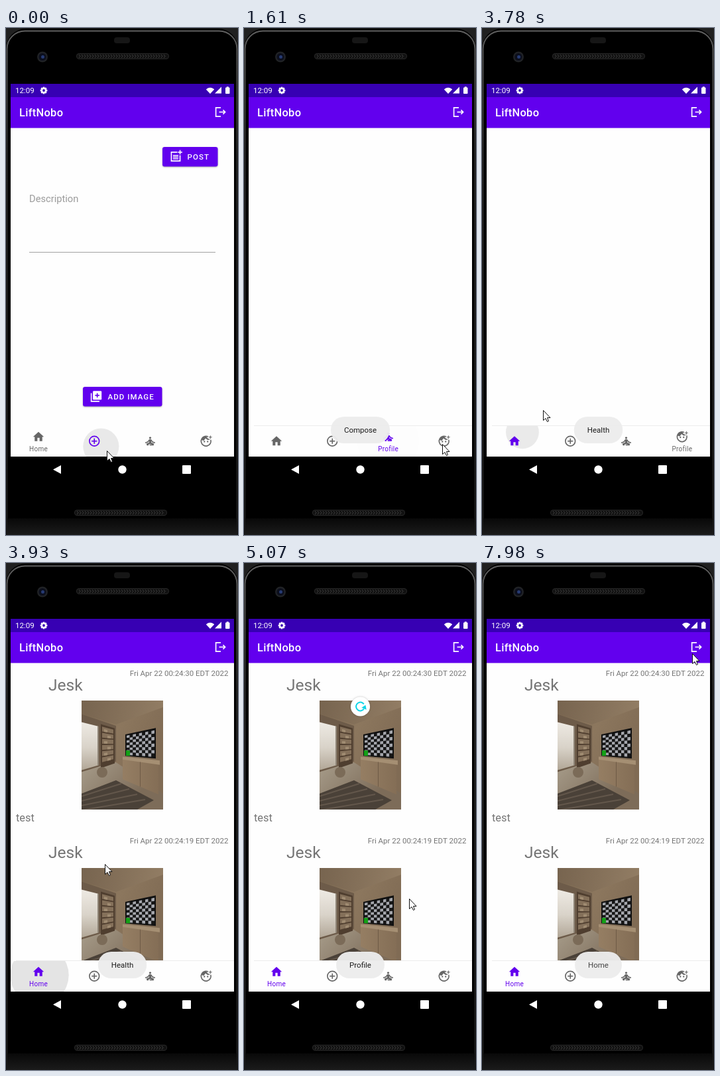
Write an HTML page with a canvas that moves like this. It is 350 px wide and 763 px high and loops after 8000 ms.

```html
<!DOCTYPE html>
<html lang="en">
<head>
<meta charset="utf-8">
<title>Phone app tour</title>
<style>
html, body { margin: 0; height: 100%; overflow: hidden; background: #000; }
canvas { display: block; width: 350px; height: 763px; }
</style>
</head>
<body>
<canvas id="stage" width="350" height="763"></canvas>
<script>
const ctx = document.getElementById('stage').getContext('2d');
const LOOP = 8000, STEP = 135, FIRST_STEP = 120;
const PURPLE = '#6200ee', GREY = '#757575', NAV_GREY = '#666';
const PAGE = { x: 7, y: 150, w: 337, h: 495 };
const NAV_TOP = 599, MIDDLE = 175.5;
const clamp = v => Math.max(0, Math.min(1, v));
const mix = (a, b, k) => a + (b - a) * k;
const progress = (t, start, end) => clamp((t - start) / (end - start));

// Each tap selects the next tab, wrapping back to the first.
const labels = ['Home', 'Compose', 'Profile', 'Profile'];
const tabX = i => 49 + i * 84.25;
const taps = [-120, 1090, 2290, 3660].map((at, i) => ({ at, from: i, to: (i + 1) % 4 }));
const toasts = [
  { at: 1200, label: 'Compose' }, { at: 2280, label: 'Health' },
  { at: 4300, label: 'Profile' }, { at: 6000, label: 'Home' }
];
const pull = { start: 4150, end: 4440, settle: 4650, gone: 5220 };
const moves = [
  { start: 0, end: 390, x: 220, y: 631 },
  { start: 1200, end: 1470, x: 299, y: 626 },
  { start: 3000, end: 3500, x: 69, y: 599 },
  { start: 3660, end: 3765, x: 92, y: 575 },
  { start: 3765, end: 4080, x: 225, y: 290 },
  { start: pull.start, end: pull.end, x: 249, y: 505 },
  { start: 5400, end: 6200, x: 317, y: 136 }
];
function cursorAt(t) {
  let x = 152, y = 636;
  for (const m of moves) {
    const k = progress(t, m.start, m.end);
    x = mix(x, m.x, k);
    y = mix(y, m.y, k);
  }
  return { x, y };
}

function rect(x, y, w, h, color, r = 0) {
  ctx.fillStyle = color;
  ctx.beginPath();
  ctx.roundRect(x, y, w, h, r);
  ctx.fill();
}
function disc(x, y, r, color) {
  ctx.fillStyle = color;
  ctx.beginPath();
  ctx.arc(x, y, r, 0, 7);
  ctx.fill();
}
function ring(x, y, r, color, width, from = 0, to = Math.PI * 2) {
  ctx.strokeStyle = color;
  ctx.lineWidth = width;
  ctx.beginPath();
  ctx.arc(x, y, r, from, to);
  ctx.stroke();
}
function trace(points) {
  ctx.beginPath();
  for (let i = 0; i < points.length; i += 2) ctx.lineTo(points[i], points[i + 1]);
}
function poly(color, ...points) {
  ctx.fillStyle = color;
  trace(points);
  ctx.closePath();
  ctx.fill();
}
function line(color, width, ...points) {
  ctx.strokeStyle = color;
  ctx.lineWidth = width;
  trace(points);
  ctx.stroke();
}
function plus(x, y, r, color, width) {
  line(color, width, x - r, y, x + r, y);
  line(color, width, x, y - r, x, y + r);
}
function text(str, x, y, size, color, { weight = 400, align = 'left', spacing = 0 } = {}) {
  ctx.font = `${weight} ${size}px Roboto, sans-serif`;
  ctx.letterSpacing = spacing + 'px';
  ctx.textAlign = align;
  ctx.fillStyle = color;
  ctx.fillText(str, x, y);
}
function scoped(draw) {
  ctx.save();
  draw();
  ctx.restore();
}
function clipped(x, y, w, h, draw) {
  scoped(() => {
    ctx.beginPath();
    ctx.rect(x, y, w, h);
    ctx.clip();
    draw();
  });
}
// Draws on a 24-unit icon grid centred on x, y.
function icon(x, y, draw, color) {
  scoped(() => {
    ctx.translate(x, y);
    ctx.scale(.82, .82);
    ctx.translate(-12, -12);
    draw(color);
  });
}
function gradient(x1, y1, x2, y2, ...colors) {
  const g = ctx.createLinearGradient(x1, y1, x2, y2);
  colors.forEach((c, i) => g.addColorStop(i / (colors.length - 1), c));
  return g;
}

function home(color) {
  poly(color, 12, 3, 22, 12, 19, 12, 19, 20, 14, 20, 14, 14, 10, 14, 10, 20, 5, 20, 5, 12, 2, 12);
}
function compose(color) {
  ring(12, 12, 9, color, 2);
  plus(12, 12, 5, color, 2);
}
function yoga(color) {
  disc(12, 6, 2, color);
  line(color, 2, 3, 15, 7.5, 13.5, 10.5, 10, 13.5, 10, 16.5, 13.5, 21, 15);
  rect(10, 9, 4, 7, color);
  line(color, 3, 5.5, 18, 12, 15.6, 18.5, 18);
  line(color, 2, 6, 19, 9, 19);
  line(color, 2, 11, 19, 18.5, 19);
}
function face(color) {
  ring(12, 12, 9, color, 2, -.25, 5.15);
  poly(color, 3, 10, 7, 4, 12, 3, 15, 7, 20, 9, 15, 10, 11, 7, 8, 11);
  for (const x of [9, 15]) disc(x, 13, 1.4, color);
  scoped(() => {
    ctx.translate(20, 4.8);
    for (let i = 0; i < 4; i++) {
      poly(color, 0, -3.8, 1, -1, -1, -1);
      ctx.rotate(Math.PI / 2);
    }
    rect(-1, -1, 2, 2, color);
  });
}
const tabIcons = [home, compose, yoga, face];
function note(color) {
  line(color, 2, 15, 4, 4, 4, 4, 20, 20, 20, 20, 9.5);
  for (const y of [10, 13, 16]) line(color, 1.8, 7, y, 17, y);
  plus(20, 4, 4, color, 2);
}
function stack(color) {
  line(color, 2, 3, 6, 3, 21, 18, 21);
  rect(6, 2, 16, 16, color, 1.5);
  plus(14, 10, 4, PURPLE, 2);
}
function logout(color) {
  line(color, 2, 12, 4, 3, 4, 3, 20, 12, 20);
  line(color, 2, 9, 12, 20, 12);
  line(color, 2, 16.2, 8.2, 20, 12, 16.2, 15.8);
}
function gear(color) {
  for (let i = 0; i < 4; i++) {
    const a = i * Math.PI / 4, c = Math.cos(a) * 6.5, s = Math.sin(a) * 6.5;
    line(color, 3.2, 12 - c, 12 - s, 12 + c, 12 + s);
  }
  disc(12, 12, 5, color);
  disc(12, 12, 2.3, '#3700b3');
}

function speaker(x, y) {
  rect(x, y, 140, 9, '#292929', 4.5);
  rect(x + 1, y + 1, 138, 7, '#111', 3.5);
  for (let i = 4; i < 136; i += 4) line('#414141', 1, x + i, y + 2, x + i + 2, y + 4.5, x + i, y + 7);
}
function phone() {
  rect(0, 0, 350, 763, '#202020');
  rect(0, 1, 350, 790, '#000', 30);
  ctx.strokeStyle = gradient(0, 0, 0, 763, '#606060', '#2c2c2c', '#242424', '#202020', '#1a1a1a');
  ctx.lineWidth = 2;
  ctx.beginPath();
  ctx.roundRect(1.5, 4.5, 347, 790, 27);
  ctx.stroke();
  rect(2, 738, 346, 25, gradient(0, 736, 0, 763, '#070707', '#1b1b1b'));
  rect(163, 14, 24, 9, '#161616', 4);
  speaker(106, 38);
  speaker(103, 725);
  disc(55, 43.5, 8, '#202225');
  disc(55, 43.5, 5.5, '#0b0e1c');
  disc(55.5, 43.5, 2.5, '#263a72');
}
function systemBar() {
  poly('#fff', 71, 664.5, 83, 658, 83, 671);
  disc(MIDDLE, 664.5, 6.2, '#fff');
  rect(266, 658, 13, 13, '#fff', 1);
}
function statusAndTitle() {
  rect(PAGE.x, 84, PAGE.w, 20, '#3700b3');
  rect(PAGE.x, 104, PAGE.w, 46.5, PURPLE);
  text('12:09', 14, 98, 11.6, '#fff');
  icon(57, 94, gear, '#fff');
  ctx.fillStyle = '#fff';
  ctx.beginPath();
  ctx.moveTo(308, 99);
  ctx.arc(308, 98, 8.2, -Math.PI * .77, -Math.PI * .23);
  ctx.fill();
  poly('#fff', 315, 98.5, 325, 98.5, 325, 88.5);
  rect(331, 89.5, 6.5, 9.5, '#fff', 1);
  rect(332.8, 88.3, 3, 2, '#fff');
  text('LiftNobo', 20, 133, 16.4, '#fff', { weight: 500, spacing: .3 });
  icon(324, 126.5, logout, '#fff');
}

function button(x, y, w, label, glyph) {
  scoped(() => {
    ctx.shadowColor = 'rgba(0,0,0,.3)';
    ctx.shadowBlur = 2;
    ctx.shadowOffsetY = 1;
    rect(x, y, w, 29.5, PURPLE, 3.3);
  });
  icon(x + 20, y + 14.5, glyph, '#fff');
  text(label, x + 37.5, y + 19, 11.5, '#fff', { weight: 500, spacing: 1.05 });
}
function composePage() {
  button(236, 179, 83.5, 'POST', note);
  text('Description', 35, 262, 14.7, '#9b9b9b');
  rect(35, 337, 281, 1, '#a2a2a2');
  button(116, 540, 119.5, 'ADD IMAGE', stack);
}

// A wall panel whose top and bottom edges run to a vanishing point with the given slopes.
function panel(vanish, color, x1, x2, top, bottom) {
  const y = (x, slope) => vanish.y + slope * Math.abs(x - vanish.x);
  poly(color, x1, y(x1, top), x2, y(x2, top), x2, y(x2, bottom), x1, y(x1, bottom));
}
function windowWall() {
  const onWall = (...args) => panel({ x: 134, y: 66 }, ...args);
  onWall('#6d5b49', 0, 52, -.34, .31);
  onWall(gradient(0, 35, 0, 106, '#ece8e1', '#d9d3c9', '#b0a595'), 0, 25, -.25, .29);
  onWall('#8f8577', 24, 26, -.25, .29);
  onWall('#4f3e2f', 29, 50, -.29, .34);
  for (let i = 0; i < 6; i++) {
    const shelf = mix(-.26, .28, i / 6);
    onWall('#84705a', 31, 48, shelf, shelf + .07);
    onWall('#a08c72', 34 + i % 2 * 5, 39 + i % 2 * 5, shelf + .03, shelf + .07);
  }
}
function tvWall() {
  const onWall = (...args) => panel({ x: -44, y: 74 }, ...args);
  onWall(gradient(62, 0, 116, 0, '#957e63', '#846e56'), 62, 116, .13, .42);
  onWall('#a58f73', 62, 118, .1, .14);
  onWall('#6e5b46', 88, 89, .14, .42);
  onWall('#111', 66, 112, -.21, .085);
  const cols = 9, rows = 8, slope = k => mix(-.19, .07, k / rows);
  for (let c = 0; c < cols; c++)
    for (let r = 0; r < rows; r++)
      onWall((c + r) % 2 ? '#161616' : '#a4a6ac', mix(68, 110, c / cols), mix(68, 110, (c + 1) / cols), slope(r), slope(r + 1));
  onWall('#13a016', 67, 73, .01, .08);
}
function room(x, y) {
  clipped(x, y, 123, 164, () => {
    ctx.translate(x, y);
    rect(0, 0, 123, 164, gradient(0, 0, 123, 60, '#79664f', '#8c775e', '#806b54'));
    poly(gradient(0, 0, 123, 20, '#77644f', '#927d64'), 0, 0, 123, 0, 123, 10, 52, 36, 0, 20);
    poly(gradient(0, 100, 60, 164, '#a59a88', '#7d6c59'), 0, 104, 52, 93, 123, 140, 123, 164, 0, 164);
    windowWall();
    poly('#4a4138', 0, 140, 52, 120, 109, 150, 84, 164, 0, 164);
    for (let i = 0; i < 4; i++) line('#63574b', 2, 0, 144 + i * 7, 60 + i * 12, 125 + i * 8);
    disc(31, 108, 8, '#7b6b58');
    tvWall();
  });
}
function post(y, name, date, body, withPhoto) {
  text(date, 335.4, y + 20, 11.48, GREY, { align: 'right' });
  text(name, 64, y + 42, 24.6, GREY);
  if (withPhoto) room(114, y + 57);
  text(body, 15, y + 239, 16.4, GREY);
}
function page(t) {
  if (t < taps[1].at + 100) composePage();
  if (t > 2400 && t < 3700) post(150, 'Guest', 'Thu Apr 21 13:59:39 EDT 2022', 'try data', false);
  if (t < 3900) return;
  post(150, 'Jesk', 'Fri Apr 22 00:24:30 EDT 2022', 'test', true);
  post(402, 'Jesk', 'Fri Apr 22 00:24:19 EDT 2022', 'test', true);
}
function spinner(t) {
  if (t < pull.start || t >= pull.gone) return;
  const y = mix(150, 238, progress(t, pull.start, pull.end)) - 22 * progress(t, pull.end, pull.settle);
  const size = 1 - progress(t, pull.gone - 270, pull.gone);
  scoped(() => {
    ctx.translate(MIDDLE, y);
    ctx.scale(size, size);
    ctx.shadowColor = 'rgba(0,0,0,.25)';
    ctx.shadowBlur = 3;
    disc(0, 0, 16.4, '#fff');
    ctx.shadowColor = 'transparent';
    ctx.rotate((t - pull.end) / 160 - .3);
    ring(0, 0, 7.2, '#10d5e8', 2.3, -2.5, 2.6);
    poly('#10d5e8', -10, -6, -2, -2.2, -9, 2);
  });
}

function ripple(tap, age) {
  const touch = cursorAt(tap.at), grow = progress(age, 0, 260);
  const alpha = mix(.062, .105, grow) * (1 - progress(age, 270, 520));
  disc(mix(touch.x, tabX(tap.to), grow), mix(touch.y, 622, grow), mix(10, 47, grow), `rgba(0,0,0,${alpha})`);
}
function bottomNav(t) {
  clipped(PAGE.x, NAV_TOP, PAGE.w, 46, () => {
    rect(PAGE.x, NAV_TOP, PAGE.w, 46, '#fefefe');
    const tap = taps.filter(p => p.at <= t).pop(), age = t - tap.at;
    const selected = age >= 100 ? tap.to : tap.from;
    const moved = progress(age, 120, 240);
    ripple(tap, age);
    labels.forEach((label, i) => {
      const lift = i === tap.to ? moved : i === tap.from ? 1 - moved : 0;
      const color = i === selected ? PURPLE : NAV_GREY;
      icon(tabX(i), 621.7 - 6.5 * lift, tabIcons[i], color);
      ctx.globalAlpha = lift;
      text(label, tabX(i) + .15, 636.5, 10, color, { align: 'center', spacing: .3 });
      ctx.globalAlpha = 1;
    });
  });
  if (t >= 1070) rect(15, 598, 329, 1, '#ececec');
}
function toast(t) {
  const current = toasts.filter(({ at }) => at <= t).pop();
  if (!current) return;
  ctx.font = '400 11.5px Roboto, sans-serif';
  ctx.letterSpacing = '0px';
  const w = ctx.measureText(current.label).width + 40;
  rect(MIDDLE - w / 2, 585, w, 40, 'rgba(237,237,237,.96)', 20);
  ctx.globalAlpha = 1 - .2 * progress(t, 7900, 7950);
  text(current.label, MIDDLE, 609.3, 11.5, '#1c1c1c', { align: 'center' });
  ctx.globalAlpha = 1;
}
function cursor(t) {
  const { x, y } = cursorAt(t);
  scoped(() => {
    ctx.translate(Math.round(x) + .5, Math.round(y) + .5);
    poly('#fff', 0, 0, 0, 15, 3.5, 12, 6, 17, 8, 16, 6, 11, 10.5, 11);
    ctx.strokeStyle = '#111';
    ctx.lineWidth = 1;
    ctx.lineJoin = 'round';
    ctx.stroke();
  });
}

function draw(time) {
  const t = time < FIRST_STEP ? 0 : time - (time - FIRST_STEP) % STEP;
  phone();
  rect(PAGE.x, PAGE.y, PAGE.w, PAGE.h, '#fefefe');
  clipped(PAGE.x, PAGE.y, PAGE.w, NAV_TOP - PAGE.y, () => {
    page(t);
    spinner(t);
  });
  statusAndTitle();
  bottomNav(t);
  systemBar();
  toast(t);
  cursor(t);
}
const start = performance.now();
function loop() {
  draw((performance.now() - start) % LOOP);
  requestAnimationFrame(loop);
}
loop();
</script>
</body>
</html>
```
